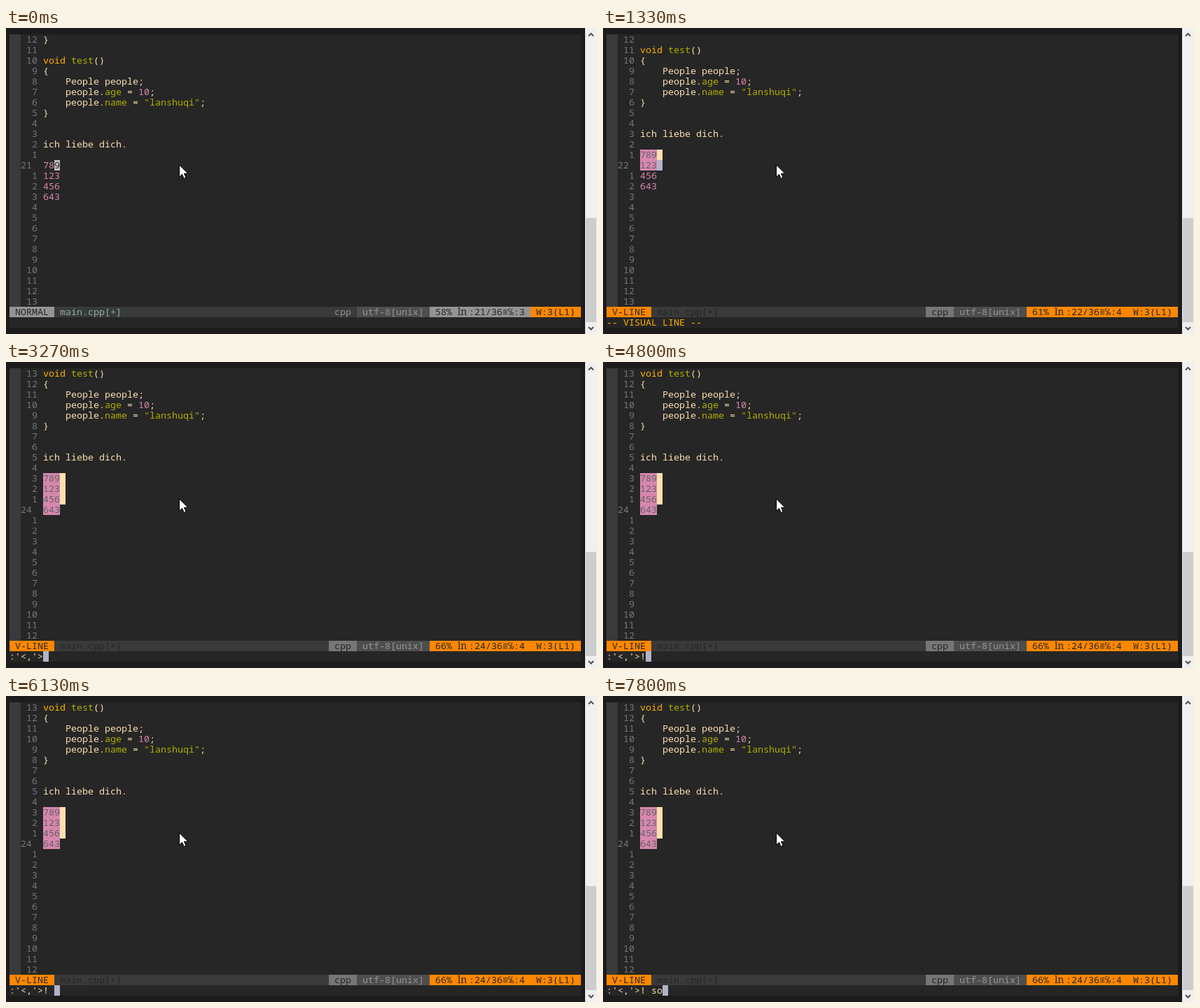
Write an HTML page that moves like this. It is 844 by 438 pixels and loops after 8000 ms.

```html
<!DOCTYPE html>
<html lang="en">
<head>
<meta charset="utf-8">
<title>Editor session</title>
<style>
  html, body { margin: 0; width: 100%; height: 100%; overflow: hidden; background: #1c1c1c; }
  svg { display: block; width: 844px; height: 438px; }
  text { font: 13.333px "Noto Sans Mono", "DejaVu Sans Mono", monospace; white-space: pre; }
  text.serif { font: 14px "Noto Serif", "Liberation Serif", serif; }
  rect { shape-rendering: crispEdges; }
</style>
</head>
<body>
<svg viewBox="0 0 844 438">
  <rect width="844" height="438" fill="#1c1c1c"/>
  <rect x="5" y="9" width="816" height="420" fill="#262626"/>
  <rect x="5" y="9" width="16" height="390" fill="#3a3a3a"/>
  <g id="screen"></g>
  <rect x="827" width="17" height="438" fill="#f0f0f0"/>
  <rect x="828" y="272" width="15" height="149" fill="#cdcdcd"/>
  <path d="M832 11.5l3.5-3.5 3.5 3.5M832 428l3.5 3.5 3.5-3.5" fill="none" stroke="#505050" stroke-width="2"/>
  <path d="M247.5 196v17.2l4-3.8 2.7 6.1 2.9-1.3-2.7-5.9h5.4z" fill="#fff" stroke="#000"/>
</svg>
<script>
const LOOP = 8000, CELL = 8, LINE = 15, LEFT = 5, TOP = 9;
const STATUS_ROW = 26, COMMAND_ROW = 27, TEXT_COL = 6, LAST_LINE = 36;
const C = {
  dark: '#262626', bar: '#3a3a3a', mid: '#4e4e4e', dim: '#767676', light: '#949494',
  fg: '#ffdfaf', yellow: '#ffaf00', green: '#afaf00', purple: '#d787af',
  orange: '#ff8700', teal: '#87afaf', selected: '#626262',
  block: '#bfbfbf', caret: '#b2b2c8'
};

// Buffer lines as [colour, text] runs.
const buffer = {
  9: [['fg', '}']],
  11: [['yellow', 'void '], ['green', 'test'], ['fg', '()']],
  12: [['fg', '{']],
  13: [['fg', '    People people;']],
  14: [['fg', '    people.'], ['green', 'age'], ['fg', ' = '], ['purple', '10'], ['fg', ';']],
  15: [['fg', '    people.'], ['green', 'name'], ['fg', ' = '], ['green', '"lanshuqi"'], ['fg', ';']],
  16: [['fg', '}']],
  19: [['fg', 'ich liebe dich.']],
  21: [['purple', '789']],
  22: [['purple', '123']],
  23: [['purple', '456']],
  24: [['purple', '643']]
};

// Each step overrides part of the editor state.
const steps = [
  [0, { line: 21, top: 9, visual: false, command: null }],
  [930, { visual: true }],
  [1330, { line: 22, top: 10 }],
  [1530, { line: 23, top: 11 }],
  [1930, { line: 24 }],
  [3270, { command: '' }],
  [4800, { command: '!' }],
  [5330, { command: '!s' }],
  [5470, { command: '!so' }],
  [5930, { command: '!s' }],
  [6070, { command: '!' }],
  [6130, { command: '! ' }],
  [6270, { command: '! s' }],
  [6330, { command: '! so' }],
  [6600, { command: '! soelim' }],
  [7270, { command: '! soeli' }],
  [7400, { command: '! soel' }],
  [7530, { command: '! soe' }],
  [7800, { command: '! so' }]
];

const screen = document.getElementById('screen');
const escape = s => s.replace(/&/g, '&amp;').replace(/</g, '&lt;');

const box = (col, row, cells, color) =>
  `<rect x="${LEFT + col * CELL}" y="${TOP + row * LINE}" width="${cells * CELL}" height="${LINE}" fill="${color}"/>`;

const write = (col, row, str, color, cls = '') =>
  `<text class="${cls}" x="${LEFT + col * CELL}" y="${TOP + row * LINE + 12}" fill="${color}">${escape(str)}</text>`;

function lineNumber(n, row, current) {
  const distance = Math.abs(n - current);
  return distance
    ? write(3, row, String(distance).padStart(2), C.dim)
    : write(2, row, String(n), C.dim);
}

function codeLine(n, row, { line, visual, command }) {
  const isSelected = visual && n >= 21 && n <= line;
  const typing = command !== null;
  let out = '', col = TEXT_COL;
  if (isSelected) {
    out += box(col, row, 3, C.purple);
    if (n < line) out += box(col + 3, row, 1, C.fg);
    else if (!typing) out += box(col + 3, row, 1, C.caret);
  }
  for (const [color, str] of buffer[n] || []) {
    out += write(col, row, str, isSelected ? C.selected : C[color]);
    col += str.length;
  }
  if (!visual && n === line)
    out += box(col - 1, row, 1, C.block) + write(col - 1, row, '9', C.dark);
  return out;
}

function statusBar({ line, visual }) {
  const row = STATUS_ROW;
  const accent = visual ? C.orange : C.light;
  const put = (col, str, color = C.dark, cls) => write(col, row, str, color, cls);
  return box(0, row, 102, C.bar)
    + box(0, row, 8, accent) + put(1, visual ? 'V-LINE' : 'NORMAL')
    + put(9, 'main.cpp[+]', visual ? C.dark : C.teal)
    + (visual ? box(57, row, 5, C.dim) : '')
    + put(58, 'cpp', visual ? C.dark : C.light)
    + box(62, row, 13, C.mid) + put(63, 'utf-8[unix]', C.light)
    + box(75, row, 18, accent)
    + put(76, Math.floor(line / LAST_LINE * 100) + '%')
    + put(80, 'ln', C.dark, 'serif')
    + put(82, `:${line}/${LAST_LINE}`)
    + put(88, '≡') + put(89, '℅') + put(90, visual ? ':4' : ':3')
    + box(93, row, 9, C.orange) + put(94, 'W:3(L1)');
}

function commandLine({ visual, command }) {
  if (command === null)
    return visual ? write(0, COMMAND_ROW, '-- VISUAL LINE --', C.yellow) : '';
  const str = ":'<,'>" + command;
  return write(0, COMMAND_ROW, str, C.fg) + box(str.length, COMMAND_ROW, 1, C.caret);
}

function draw(state) {
  let out = '';
  for (let row = 0; row < STATUS_ROW; row++) {
    const n = state.top + row;
    out += lineNumber(n, row, state.line) + codeLine(n, row, state);
  }
  screen.innerHTML = out + statusBar(state) + commandLine(state);
}

let shown = -1;
function update(time) {
  const t = time % LOOP;
  const count = steps.filter(([start]) => start <= t).length;
  if (count !== shown) {
    shown = count;
    draw(Object.assign({}, ...steps.slice(0, count).map(step => step[1])));
  }
}

const begin = performance.now();
function tick() {
  update(performance.now() - begin);
  requestAnimationFrame(tick);
}
tick();
</script>
</body>
</html>
```
